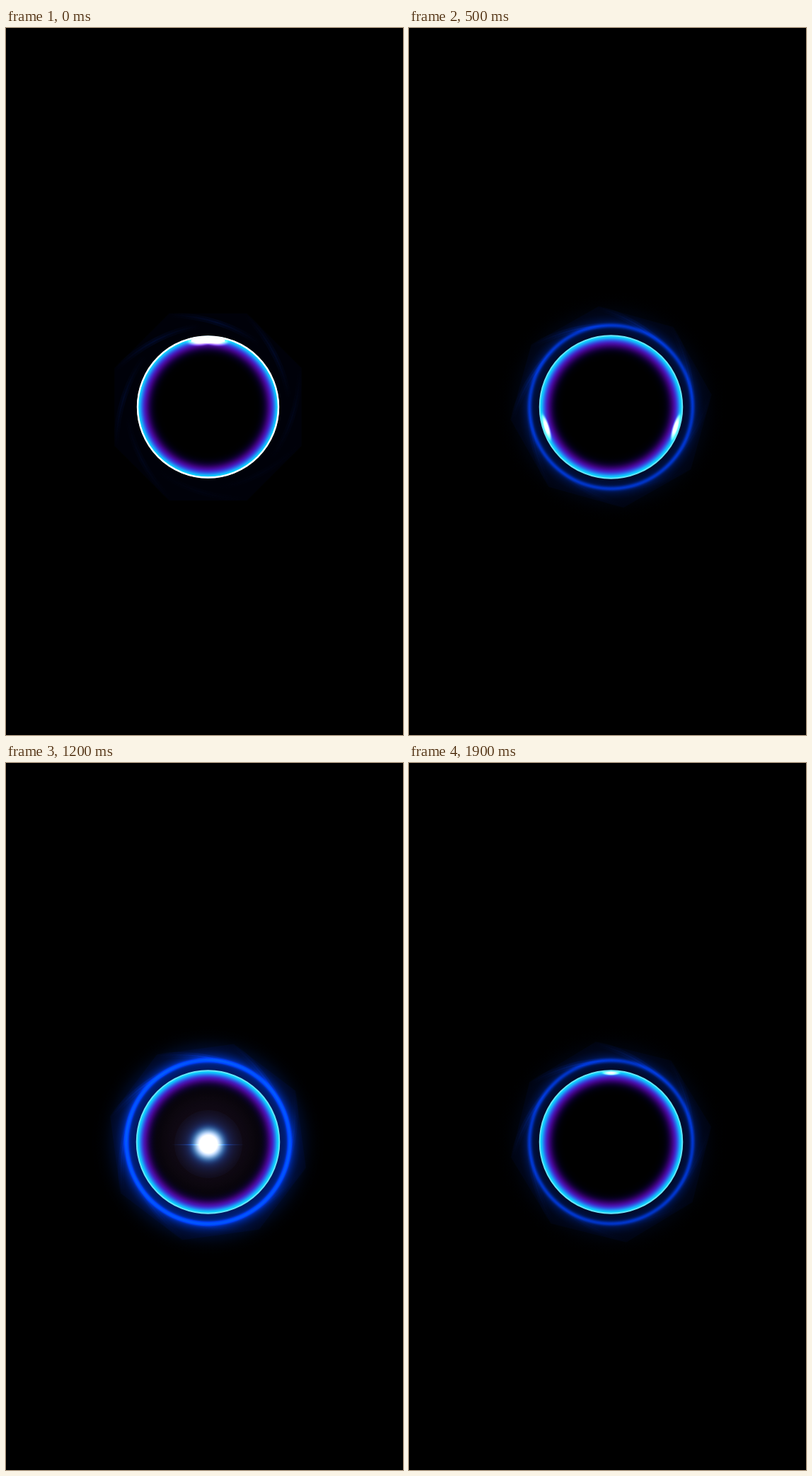
An HTML page with a canvas that plays this animation: 561 px wide and 998 px high, repeating every 2000 ms.

```html
<!DOCTYPE html>
<html lang="en">
<head>
<meta charset="utf-8">
<title>Glowing ring</title>
<style>
  html, body { margin: 0; width: 100%; height: 100%; overflow: hidden; background: #000; }
  canvas { display: block; }
</style>
</head>
<body>
<canvas id="stage" width="561" height="998"></canvas>
<script>
const ctx = document.getElementById('stage').getContext('2d');
const CX = 285.5, CY = 535, HALO_R = 115, TAU = Math.PI * 2, RAD = Math.PI / 180;
const LOOP = 2000, STEP = 100;

const clamp = x => Math.min(1, Math.max(0, x));
const bell = (x, width, power = 2) => Math.exp(-Math.pow(Math.abs(x) / width, power));
const rgb = (r, g, b) => `rgb(${Math.round(r)},${Math.round(g)},${Math.round(b)})`;
const blue = k => rgb(0, 68 * k, 255 * k);

// Eases from 0 to 1 between two times
function ramp(t, from, to) {
  const k = clamp((t - from) / (to - from));
  return k * k * (3 - 2 * k);
}

// Angles run clockwise from the top
const polar = (r, deg) => [CX + r * Math.sin(deg * RAD), CY - r * Math.cos(deg * RAD)];

function disc(x, y, r, fill) {
  ctx.fillStyle = fill;
  ctx.beginPath();
  ctx.arc(x, y, r, 0, TAU);
  ctx.fill();
}

// A disc whose color follows a function of the distance from its center
function glow(x, y, from, to, colorAt, level = 1) {
  const g = ctx.createRadialGradient(x, y, from, x, y, to);
  const steps = 24;
  for (let i = 0; i <= steps; i++) g.addColorStop(i / steps, colorAt(from + (to - from) * i / steps));
  ctx.globalAlpha = level;
  disc(x, y, to, g);
  ctx.globalAlpha = 1;
}

function arc(r, from, to, width, color) {
  ctx.strokeStyle = color;
  ctx.lineWidth = width;
  ctx.beginPath();
  ctx.arc(CX, CY, r, (from - 90) * RAD, (to - 90) * RAD);
  ctx.stroke();
}

function fadingLine([x0, y0], [x1, y1], color, alpha) {
  const g = ctx.createLinearGradient(x0, y0, x1, y1);
  g.addColorStop(0, `rgba(${color},0)`);
  g.addColorStop(.5, `rgba(${color},${alpha})`);
  g.addColorStop(1, `rgba(${color},0)`);
  return g;
}

function drawWisps(turn, halo) {
  const gain = .6 + .4 * halo;
  ctx.fillStyle = `rgba(0,8,48,${.3 * gain})`;
  ctx.beginPath();
  for (let k = 0; k < 8; k++) ctx.lineTo(...polar(143, turn + k * 45));
  ctx.fill();
  for (let k = 0; k < 8; k++) {
    const a = turn + k * 45, start = polar(141, a), end = polar(HALO_R, a + 62);
    const light = (.6 + .4 * Math.cos((a + 45) * RAD)) * gain;
    for (const width of [8, 2]) {
      ctx.strokeStyle = fadingLine(start, end, '5,45,165', .18 * light);
      ctx.lineWidth = width;
      ctx.beginPath();
      ctx.moveTo(...start);
      ctx.quadraticCurveTo(...polar(129, a + 32), ...end);
      ctx.stroke();
    }
  }
}

function drawHalo(level) {
  const spreadAt = r => r < HALO_R ? .55 : Math.exp((HALO_R - r) / 13) * clamp((165 - r) / 25);
  glow(CX, CY, 97, 165, r => blue(.75 * spreadAt(r)), Math.pow(level, 1.5));
  glow(CX, CY, 100, 130, r => blue(.75 * bell(r - HALO_R, 3) + .2 * bell(r - HALO_R, 9)), Math.sqrt(level));
}

function drawBowl(R, warmth) {
  glow(CX, CY, 60, R, r => {
    const d = R - r;
    return rgb(70 * bell(d - 11, 7), 225 * bell(d, 7), 255 * bell(d, 16, 2.5));
  });
  glow(CX, CY, 0, 90, r => rgb(18 * bell(r, 75, 4), 10 * bell(r, 75, 4), 23 * bell(r, 75, 4)), warmth);
}

function drawPool(level, top) {
  if (!level) return;
  const y = 640 - 37 * level, neck = 24;
  const side = s => ([x, dy]) => [CX + s * x, y + dy];
  const left = side(-1), right = side(1);
  const fill = ctx.createLinearGradient(0, 560, 0, 636);
  fill.addColorStop(0, '#1a58c8');
  fill.addColorStop(.5, '#1a90e8');
  fill.addColorStop(1, '#18d8fa');
  ctx.save();
  ctx.globalCompositeOperation = 'source-over';
  ctx.globalAlpha = level;
  ctx.filter = 'blur(5px)';
  ctx.fillStyle = fill;
  ctx.beginPath();
  ctx.moveTo(CX - 105, 645);
  ctx.lineTo(...left([82, -3]));
  ctx.quadraticCurveTo(...left([58, 7]), ...left([42, 0]));
  ctx.bezierCurveTo(...left([20, -6]), CX - neck, top + 17, CX - neck, top);
  ctx.bezierCurveTo(CX - neck, top - 26, CX + neck, top - 26, CX + neck, top);
  ctx.bezierCurveTo(CX + neck, top + 17, ...right([20, -6]), ...right([42, 0]));
  ctx.quadraticCurveTo(...right([58, 7]), ...right([82, -3]));
  ctx.lineTo(CX + 105, 645);
  ctx.fill();
  ctx.restore();
}

function drawOrb(y, level) {
  if (!level) return;
  const size = .5 + .5 * level;
  ctx.globalAlpha = level;
  ctx.fillStyle = fadingLine([CX - 52, 0], [CX + 52, 0], '20,90,220', .6);
  ctx.fillRect(CX - 52, y, 104, 1.5);
  glow(CX + .5, y, 0, 48 * size, r => {
    const d = r / size;
    return rgb(265 * bell(d, 18.5, 4) + 25 * bell(d, 30), 210 * bell(d, 21, 4) + 75 * bell(d, 28), 130 * bell(d, 23, 4) + 170 * bell(d, 28));
  }, level);
}

function drawSpot(deg, r, length, thick, level) {
  ctx.save();
  ctx.translate(...polar(r, deg));
  ctx.rotate(deg * RAD);
  ctx.scale(length, thick);
  glow(0, 0, 0, 1, r => {
    const k = bell(r, .6, 3) * clamp(3 - 3 * r);
    return rgb(255 * k, 255 * k, 255 * k);
  }, level);
  ctx.restore();
}

function draw(t) {
  const R = 99.5 + 1.3 * ramp(t, 200, 500);
  const rimWhite = 1 - ramp(t, 0, 350);
  const bridge = 1 - ramp(t, 150, 400);
  const halo = ramp(t, 180, 900) * (1 - .58 * clamp((t - 900) / 1000));
  const spread = 6 + 174 * ramp(t, 0, 900);
  const spots = 1 - ramp(t, 600, 800);
  const pool = ramp(t, 600, 900) * (1 - ramp(t, 900, 1200));
  const orb = ramp(t, 600, 900) * (1 - ramp(t, 1550, 1900));
  const u = (t - 1240) / 100;
  const orbY = CY - 7.5 * u - .17 * u ** 3;

  ctx.globalCompositeOperation = 'source-over';
  ctx.fillStyle = '#000';
  ctx.fillRect(0, 0, 561, 998);

  ctx.globalCompositeOperation = 'lighter';
  drawWisps(-22.5 + t * .031, halo);
  drawHalo(halo);
  ctx.globalCompositeOperation = 'source-over';
  disc(CX, CY, R, '#000');

  ctx.save();
  ctx.beginPath();
  ctx.arc(CX, CY, R + .5, 0, TAU);
  ctx.clip();
  ctx.globalCompositeOperation = 'lighter';
  drawBowl(R, orb);
  drawPool(pool, orbY);
  drawOrb(orbY, orb);
  for (const side of [-1, 1]) drawSpot(side * spread, R - 5, 26, 6 + 4 * rimWhite, spots);
  arc(R - 2, -spread - 8, spread + 8, 5, `rgba(255,255,255,${bridge})`);
  drawSpot(0, R - 3, 17, 5, .9 * ramp(t, 1700, 1900));
  ctx.restore();

  ctx.globalCompositeOperation = 'source-over';
  arc(R, 0, 360, 1.9, '#68e4fa');
  arc(R, 0, 360, 2.4, `rgba(255,255,255,${rimWhite})`);
}

function tick(now) {
  draw(Math.floor((now % LOOP) / STEP) * STEP);
  requestAnimationFrame(tick);
}
draw(0);
requestAnimationFrame(tick);
</script>
</body>
</html>
```
